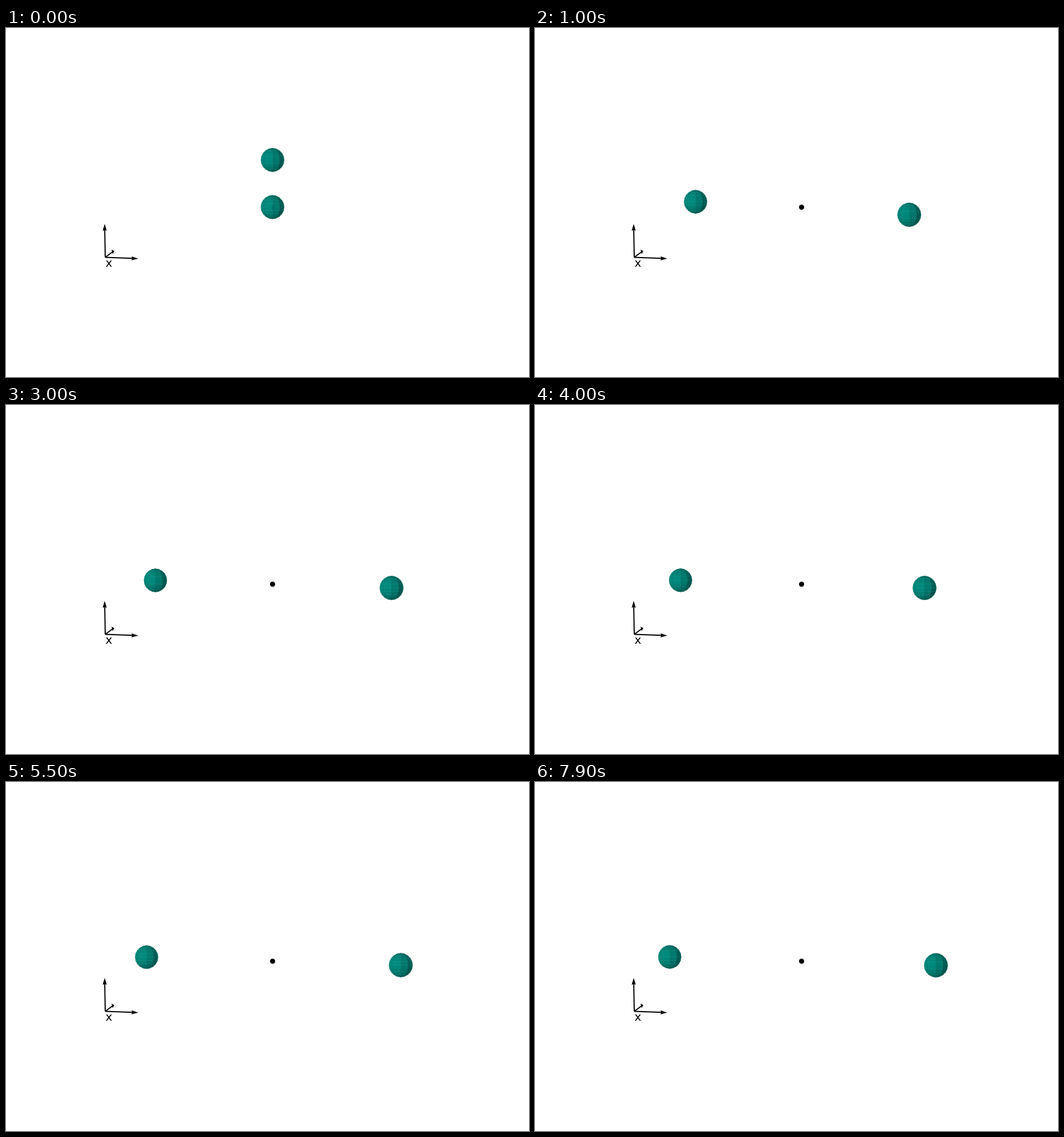
An HTML page with a canvas for the animation above (8 s loop, 917 by 611 pixels).

```html
<!DOCTYPE html>
<html lang="en">
<head>
<meta charset="utf-8">
<title>Two repelling spheres</title>
<style>
html, body { margin: 0; width: 100%; height: 100%; overflow: hidden; background: #fff; }
canvas { display: block; }
</style>
</head>
<body>
<canvas id="stage" width="917" height="611"></canvas>
<script>
const ctx = document.getElementById('stage').getContext('2d');
const LOOP = 8000, STEP = 100, RAD = Math.PI / 180;

// time, left x, left y, right x, right y
const path = [
  [0, 467.3, 313.5, 467.3, 231],
  [100, 456, 331, 478.5, 238],
  [200, 425, 343, 509.5, 255],
  [350, 365, 330, 570, 283],
  [500, 322, 305, 614.3, 304],
  [700, 296, 301, 640, 323],
  [900, 284.5, 303.3, 653, 327.3],
  [1300, 275.5, 306.2, 662, 323.5],
  [1700, 271.5, 306.1, 666, 320.4],
  [2100, 268.3, 306.8, 669.5, 321.4],
  [3000, 262, 307, 676, 320.2],
  [4000, 255.2, 306.8, 683, 320.2],
  [5500, 246.5, 306.6, 692.2, 320.6],
  [7900, 236.2, 306.3, 703, 320.9]
];

// Cubic Hermite interpolation over unevenly spaced keys
function sample(t, col) {
  const last = path.length - 1;
  let i = 0;
  while (i < last - 1 && path[i + 1][0] <= t) i++;
  const slope = k => {
    const a = path[Math.max(k - 1, 0)], b = path[Math.min(k + 1, last)];
    return (b[col] - a[col]) / (b[0] - a[0]);
  };
  const a = path[i], b = path[i + 1], h = b[0] - a[0], u = (t - a[0]) / h, v = 1 - u;
  return v * v * (1 + 2 * u) * a[col] + u * u * (3 - 2 * u) * b[col]
    + h * u * v * (v * slope(i) - u * slope(i + 1));
}

function polygon(points, color) {
  ctx.beginPath();
  points.forEach(p => ctx.lineTo(...p));
  ctx.closePath();
  ctx.fillStyle = color;
  ctx.fill();
}

function line(x1, y1, x2, y2) {
  ctx.beginPath();
  ctx.moveTo(x1, y1);
  ctx.lineTo(x2, y2);
  ctx.stroke();
}

// Flat-shaded sphere lit from the upper left
function sphere(x, y) {
  const r = 20.5 + (x - 467) * 0.0013;
  const at = (lat, lon) => [
    x + 1.045 * r * Math.cos(lat * RAD) * Math.sin(lon * RAD),
    y - r * Math.sin(lat * RAD)
  ];
  ctx.lineWidth = 0.5;
  for (let lon = -108; lon < 108; lon += 36) {
    for (let lat = -90; lat < 90; lat += 18) {
      const a = Math.max(lon, -90), b = Math.min(lon + 36, 90);
      const east = (lon + 18) * RAD, north = (lat + 9) * RAD;
      const lit = Math.cos(north) * (0.84 * Math.cos(east) - 0.48 * Math.sin(east))
        + 0.2 * Math.sin(north);
      const k = 0.56 + 0.37 * Math.max(lit, 0);
      const color = `rgb(0,${Math.round(150 * k)},${Math.round(136 * k)})`;
      const edgeA = lon < -72 ? -72 : a, edgeB = lon >= 72 ? 72 : b;
      if (edgeA >= edgeB) continue;
      polygon([at(lat, edgeA), at(lat, edgeB), at(lat + 18, edgeB), at(lat + 18, edgeA)], color);
      ctx.strokeStyle = color;
      ctx.stroke();
    }
  }
}

function axes() {
  ctx.strokeStyle = '#000';
  ctx.lineWidth = 2;
  line(174, 401.5, 173, 346);
  line(174, 401.5, 228, 403.6);
  line(174, 401.5, 187.5, 391.5);
  polygon([[173, 343], [169.5, 355], [173, 353.5], [176.7, 355]], '#000');
  polygon([[232, 403.8], [220, 399.8], [221.5, 403.3], [219.8, 406.8]], '#000');
  polygon([[185, 388], [189.8, 390.5], [187, 396], [186.3, 392.5]], '#000');
  ctx.font = '20px "DejaVu Sans", sans-serif';
  ctx.fillText('x', 174.6, 417.5);
}

function draw(now) {
  const t = Math.floor(now % LOOP / STEP) * STEP;
  ctx.fillStyle = '#fff';
  ctx.fillRect(0, 0, 917, 611);
  axes();
  ctx.beginPath();
  ctx.arc(467.4, 313.8, 4.5, 0, 2 * Math.PI);
  ctx.fill();
  sphere(sample(t, 1), sample(t, 2));
  sphere(sample(t, 3), sample(t, 4));
}

const start = performance.now();
function frame() {
  draw(performance.now() - start);
  requestAnimationFrame(frame);
}
frame();
</script>
</body>
</html>
```
